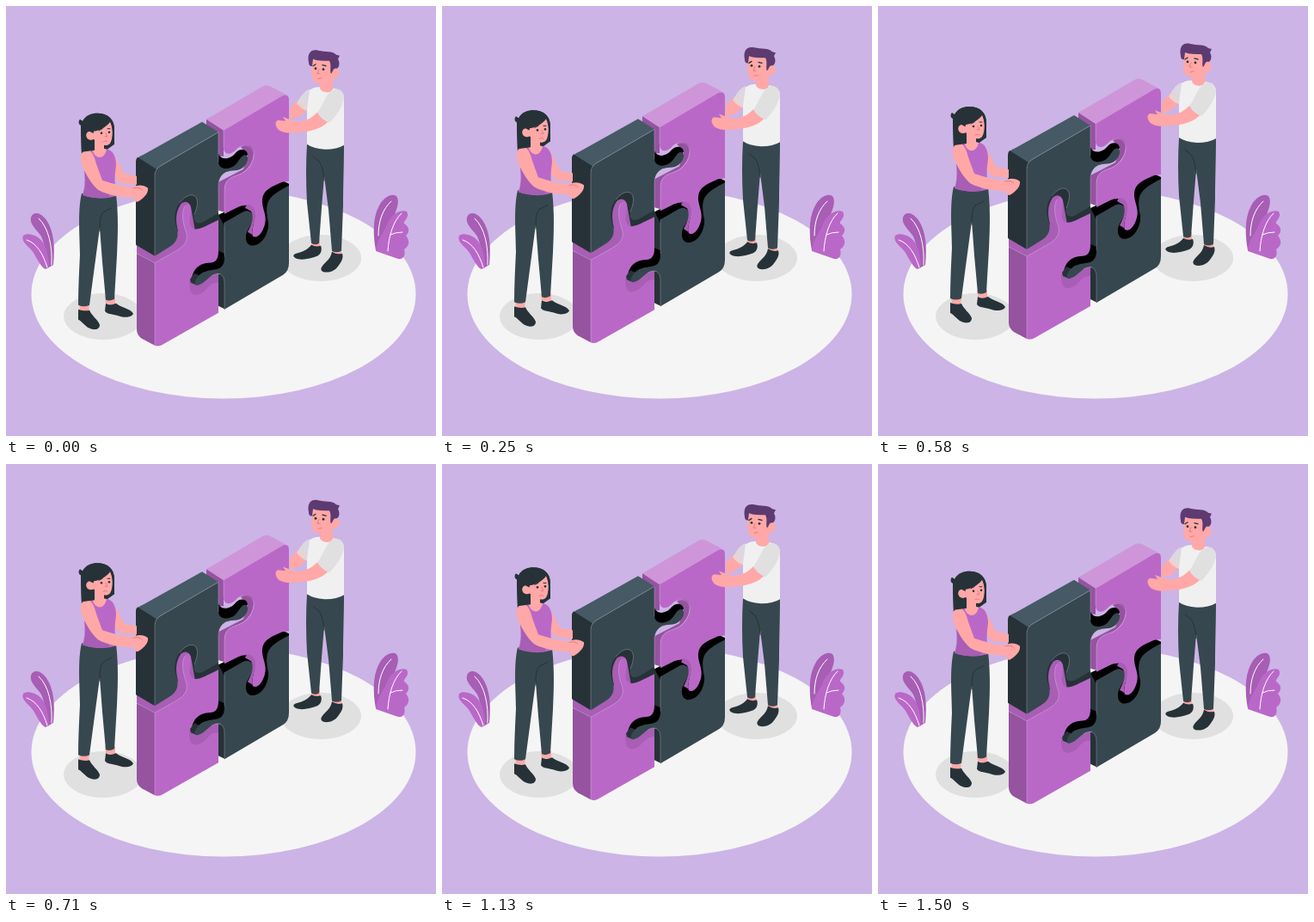
Recreate the animation shown at these times as an HTML page. Size 500 px wide and 500 px high, loop 1540 ms.

```html
<!DOCTYPE html>
<html lang="en">
<head>
<meta charset="utf-8">
<title>Puzzle teamwork</title>
<style>
html, body { margin: 0; width: 100%; height: 100%; overflow: hidden; background: #ccb4e6 }
svg { display: block; width: 100%; height: 100% }
.ground { fill: #f5f5f5 } .shadow { fill: #e0e0e0 } .shirt { fill: #f0f0f0 }
.purple { fill: #ba68c8 } .purpleSide { fill: #9553a0 } .purpleTop { fill: #cf95d9 } .purpleShade { fill: #a75eb4 }
.dark { fill: #37474f } .darkSide { fill: #263238 } .darkTop { fill: #455a64 }
.skin { fill: #ffa8a7 } .hair { fill: #5d3a70 }
.line { fill: none; stroke: #fff; stroke-linecap: round }
.edge { fill: none; stroke: #fff; stroke-width: .7; opacity: .35 }
.ink { fill: none; stroke: #263238; stroke-linecap: round }
.mouth { fill: none; stroke: #dc7473; stroke-linecap: round; stroke-width: .8 }
</style>
</head>
<body>
<svg viewBox="0 0 500 500">
  <ellipse class="ground" cx="253" cy="335" rx="223.5" ry="121.5"/>
  <ellipse class="shadow" cx="113" cy="361" rx="46" ry="27"/>
  <ellipse class="shadow" cx="366" cy="293" rx="47" ry="27"/>

  <g id="plants">
    <path class="purpleShade" d="M55 301C57 280 56 262 47 249C40 239 31 239 29 246C27 254 36 260 41 268C46 278 46 292 48 305Z"/>
    <path class="purple" d="M50 304C50 297 49 285 43 275C37 266 25 263 20 267C17 275 27 279 32 287C37 296 42 305 46 306Z"/>
    <path class="purpleShade" d="M430 284C427 268 426 248 433 234C438 223 448 217 454 221C459 228 453 239 449 250C446 262 444 275 444 287Z"/>
    <path class="purple" d="M430 285C431 272 439 264 443 254C447 242 459 236 466 239C470 246 462 249 463 253C469 257 470 262 465 267C470 273 469 279 463 283C465 290 462 295 456 294Z"/>
    <path class="line" d="M53 301C54 280 50 258 38 247M48 304C43 288 36 276 24 272M433 267C433 250 438 236 448 227M444 285C445 268 450 250 460 241M447 266Q453 263 461 263"/>
  </g>

  <g id="floating">
    <g id="puzzle">
      <!-- lower left -->
      <path class="darkSide" d="M195 285V222L222 215L247 240V262Z"/>
      <path class="purpleShade" d="M152 288V277L200 262C197 250 197 240 203 231C208 226 213 228 215 234L220 262L205 300L173 302Z"/>
      <path class="purpleSide" d="M152 288L173 299V395L158 387Q152 383 152 376Z"/>
      <path class="purple" d="M173 299L198 285C210 278 212 271 209 262C205 250 204 240 208 233C211 228 215 230 215 237C215 246 211 252 216 258C221 263 230 257 247 249V357L182 394Q178 396.500 173 395Z"/>
      <path class="edge" d="M152 288L173 299V395M173 299L198 285C210 278 212 271 209 262C205 250 204 240 208 233"/>
      <path class="purpleShade" d="M213 320C213 331 215 337 222 336C235 333 235 321 247 322V300H230Z"/>

      <!-- lower right -->
      <path class="darkSide" d="M247 243L254 250V300H247ZM247 312H255V353L247 349Z"/>
      <path d="M216 317C218 305 225 300 235 299C244 299 247 295 247 285L254 288V300L245 311L222 320Z"/>
      <path class="darkSide" d="M214 318L219 311L226 314L222 325L215 322Z"/>
      <path d="M247 243L275 230L294 222V218L321 203L329 207V240L306 275L285 280L276 275V245L254 256Z"/>
      <path class="dark" d="M254 252L275 240C282 236 288 240 287 248C286 255 280 260 279 267C278 276 283 281 291 278C300 275 306 262 305 252C303 241 301 231 308 223C312 218 320 214 329 209V299Q329 309 322 313L254 353V322C254 312 247 309 239 314C233 318 230 323 223 325C218 325 219 320 223 315C228 309 234 308 241 307C250 306 254 303 254 292Z"/>
      <path class="edge" d="M254 353V322C254 312 247 309 239 314M254 292V252"/>

      <!-- upper right -->
      <path class="purpleTop" d="M233 132L298 94Q303 91 308 94L325 103L322 105L253 145Z"/>
      <path class="purpleSide" d="M233 132L253 145V175H247V148L233 140Z"/>
      <path class="purple" d="M253 145L321 105Q329 101 329 110V204L321 205C307 211 299 215 298 225C297 235 304 243 301 254C298 265 292 271 287 268C284 263 290 250 289 242C286 230 277 231 270 234L254 242V215C254 203 260 200 269 197C281 194 289 181 288 171C286 161 276 160 268 167C262 173 254 175 253 165Z"/>
      <path class="purpleShade" d="M280 231C288 230 291 239 290 246C288 253 286 259 286 266L281 263C285 255 289 247 285 239L278 235Z"/>
      <path class="purpleSide" d="M273 164C280 159 289 163 288 172C288 183 279 194 269 197C260 200 254 203 254 215V240L247 238V205L276 190L281 174Z"/>
      <path d="M247 172C250 180 261 179 267 171C273 165 280 167 281 173L273 185L258 193L247 190Z"/>
      <path class="edge" d="M254 240V215C254 203 260 200 269 197C281 194 289 181 288 171C286 161 276 160 268 167M253 145V165"/>

      <!-- upper left -->
      <path class="darkTop" d="M153 177Q155 175 160 173L228 135L247 147L180 186Q174 190 173 195Z"/>
      <path class="darkSide" d="M151 181Q151 178 153 176L175 190L173 197V291L151 278Z"/>
      <path class="dark" d="M173 291V197Q173 190 180 186L247 147V182C248 190 256 191 264 187C270 183 271 177 276 174C281 172 283 178 279 184C274 192 268 191 260 192C251 194 247 201 247 210V241L230 251C222 255 217 251 219 243C222 235 224 228 221 223C217 217 208 221 202 229C195 238 195 249 199 260C201 269 198 276 189 281Z"/>
      <path class="edge" d="M173 291V197Q173 190 180 186L247 147V182M247 241V210C247 201 251 194 260 192M219 243C222 235 224 228 221 223C217 217 208 221 202 229"/>
    </g>

    <g id="woman">
      <path class="skin" d="M123 173C129 175 131 185 137 195Q144 197 152 198V208L133 206Q126 200 121 189Z"/>
      <path class="darkSide" d="M87 139C84 138 84 134 86 132L89 134C93 127 99 125 106 125C119 125 126 132 126 144V161L115 169L88 174Q87 160 87 139Z"/>
      <path class="skin" d="M116 346L115 338H127V348ZM85 345H97L96 357L86 356Z"/>
      <path class="darkSide" d="M84 353C89 355 94 355 97 354C100 361 107 365 109 371C109 377 102 378 95 374C90 370 87 366 84 365ZM116 346C121 349 125 347 128 346C134 351 145 352 148 358C146 363 136 363 129 360C122 358 118 359 115 355Z"/>
      <path class="dark" d="M88 218Q108 225 128 219C131 245 130 268 129 290L126 341Q121 344 116 342L112 298L109 258L103 303L97 348Q91 351 84 348C84 329 85 310 86 289C86 270 83 239 88 218Z"/>
      <path class="ink" d="M109 262C109 252 109 245 113 240L123 235"/>
      <path class="skin" d="M96 168L103 165V155H114V166L124 169L120 184H98Z"/>
      <path class="purple" d="M100 166C103 179 114 180 117 167C124 167 128 175 128 185C127 196 125 202 129 221Q109 227 89 220C94 205 90 191 91 180Z"/>
      <path class="purpleShade" d="M89 220C93 212 93 203 91 190L107 209L120 220V223Q102 225 89 220Z"/>
      <path class="skin" d="M93 168C99 166 103 175 105 184L112 203C124 207 136 210 147 211C153 208 160 208 165 212C166 218 160 224 153 228C149 228 149 225 150 223C139 223 119 221 107 214C99 207 90 192 87 181C86 174 88 169 93 168Z"/>
      <path class="mouth" d="M148 212Q155 210 158 214"/>
      <path class="skin" d="M100 141L121 134C125 141 125 153 121 160C117 165 106 161 102 155C94 159 90 149 97 146Z"/>
      <path class="darkSide" d="M88 154C87 134 95 125 106 125C118 125 126 132 126 143V161L122 162C125 151 124 141 121 135C117 141 109 145 102 146L101 151C98 145 93 146 93 152L95 157L103 160V168L88 170Z"/>
      <path class="skin" d="M102 155C94 159 90 147 97 146L103 149Z"/>
      <circle class="darkSide" cx="111" cy="148" r="1.300"/><circle class="darkSide" cx="120" cy="147" r="1.300"/>
      <path class="ink" d="M108 145L112 143M118 143L121 143"/>
      <path class="mouth" d="M116 148L118 152L115 152M113 158Q116 156 118 158"/>
    </g>

    <g id="man">
      <path class="skin" d="M342 108L352 119L341 129L330 132V119Z"/>
      <path class="shadow" d="M353 97C346 99 342 107 338 113Q343 120 350 122L356 106Z" opacity=".8"/>
      <path class="skin" d="M355 271H365V282H355ZM379 282H390V291H379Z"/>
      <path class="darkSide" d="M355 278Q360 281 366 279C368 284 366 289 362 291C353 294 343 297 336 293C332 290 336 288 341 287C348 285 352 282 355 278ZM379 286Q385 290 391 288C393 294 389 299 386 303C381 310 373 311 368 309C364 306 368 302 372 298C376 294 378 291 379 286Z"/>
      <path class="dark" d="M350 161H393C393 185 392 211 392 232L390 285Q384 288 379 285L375 237L370 198L367 235L364 276Q360 279 355 276L350 229Q348 193 350 161Z"/>
      <path class="ink" d="M370 203C369 192 367 185 364 181L357 175"/>
      <path class="shirt" d="M353 98C358 95 362 94 366 95L380 96C389 97 393 101 393 107V162Q385 167 371 167Q357 166 350 161V120Z"/>
      <path class="skin" d="M367 84L380 82V97C377 103 367 101 365 96Z"/>
      <path class="skin" d="M362 124C356 130 350 133 345 134C336 136 331 132 324 130L322 129L325 134L316 133C312 135 313 141 318 145C327 150 339 147 351 146C362 144 372 139 377 132Z"/>
      <path class="shadow" d="M382 97C389 96 393 101 393 108C391 118 384 128 376 136Q366 132 362 124C369 117 371 101 382 97Z"/>
      <path class="skin" d="M356 63C354 73 355 83 358 88C363 93 376 91 380 85C389 85 390 73 383 72L382 60Z"/>
      <path class="hair" d="M352 66C350 56 354 50 363 52C371 54 380 52 384 57L388 58L386 62C389 67 387 73 384 73C380 72 380 78 378 79C376 76 379 69 376 64C369 64 362 64 357 62L356 70C353 71 352 68 352 66Z"/>
      <circle class="darkSide" cx="360" cy="73" r="1.400"/><circle class="darkSide" cx="369" cy="74" r="1.400"/>
      <path class="ink" d="M357 70L360 68M368 69L372 70" stroke-width="1.300"/>
      <path class="mouth" d="M364 74L362 79L365 79M363 85L367 84"/>
    </g>
  </g>
</svg>
<script>
const floating = document.getElementById('floating');
const LOOP = 1540, PERIOD = 1500, LEAD = 21, HEIGHT = 10;

// Linear rise and fall, restarted with each loop
function draw() {
  const phase = ((performance.now() % LOOP + LEAD) % PERIOD) / PERIOD;
  const lift = HEIGHT * (1 - Math.abs(2 * phase - 1));
  floating.setAttribute('transform', `translate(0 ${-lift})`);
  requestAnimationFrame(draw);
}
draw();
</script>
</body>
</html>
```
